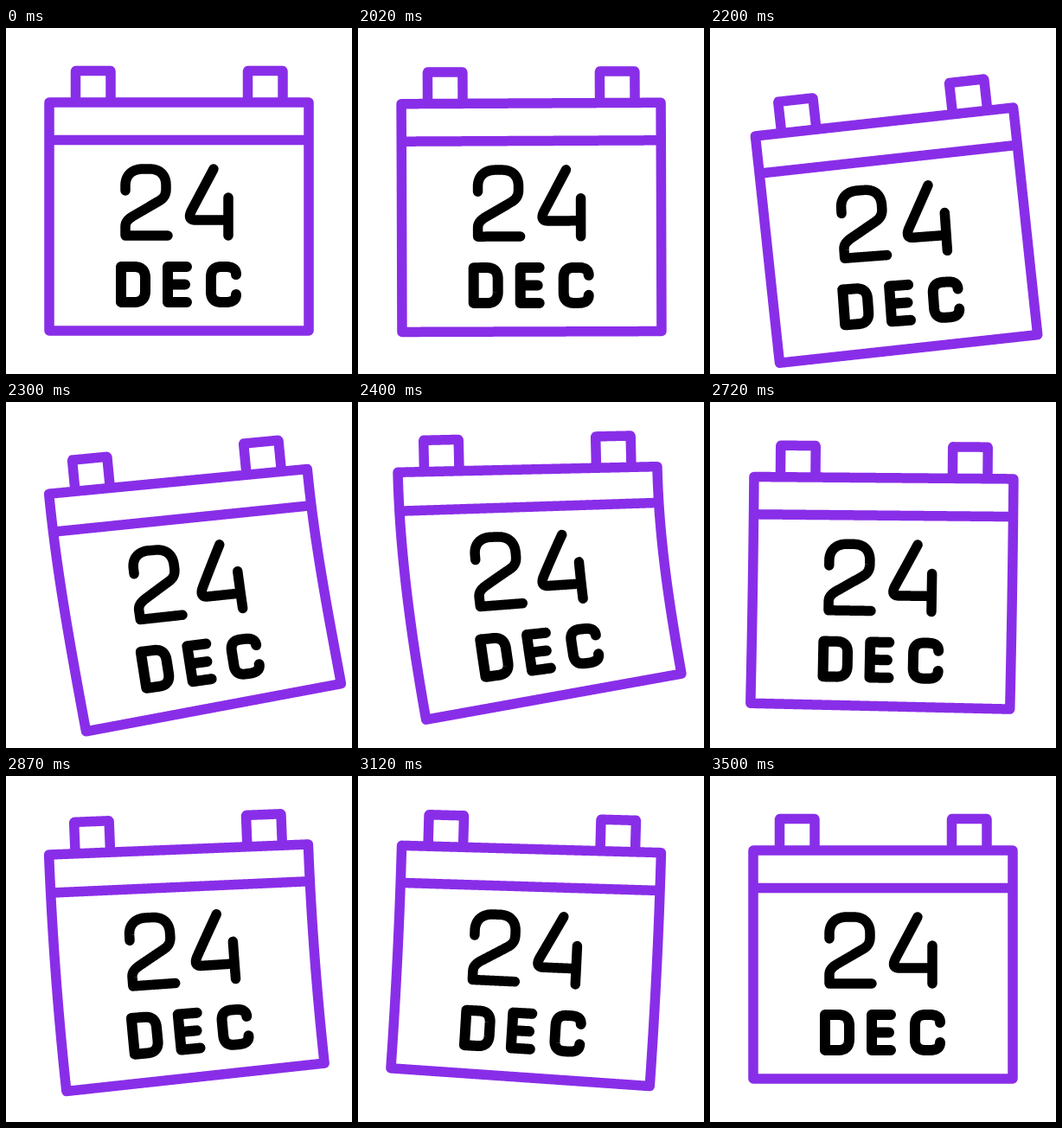
Recreate the animation shown at these times as an HTML page with a canvas. Size 400 px wide and 400 px high, loop 3.52 s.

```html
<!DOCTYPE html>
<html lang="en">
<head>
<meta charset="utf-8">
<title>Swinging calendar</title>
<style>
  html, body { margin: 0; width: 100%; height: 100%; overflow: hidden; background: #fff; }
  canvas { display: block; }
</style>
</head>
<body>
<canvas id="stage" width="400" height="400"></canvas>
<script>
const ctx = document.getElementById('stage').getContext('2d');
const LOOP = 3520, TOP = 86, HEIGHT = 264, CENTER = 200, LETTER_PIVOT = 230;

const FRAME = [
  'M50 86H350V350H50Z', 'M50 129.5H350',
  'M80.5 86V49.5H121V86', 'M279.5 86V49.5H320V86'
];
const DATE = [
  'M138 188V182C138 170 146 163 158 163H166C178 163 185 170 185 182V186C185 193 182 197 177 200L146 218C140 222 138 225 138 230V240H187',
  'M240 163L214.5 211Q209 222 219 222H257', 'M257 196V240'
];
const MONTH = [
  'M133 276V317H148Q161 317 161 304V289Q161 276 148 276Z',
  'M209 276H187V317H209', 'M187 296.5H207',
  'M266 285Q266 276 254 276H249Q237 276 237 288V305Q237 317 249 317H254Q266 317 266 308'
];

// time, y shift, top x shift, top angle, bottom x shift, bottom angle, lettering x shift, lettering turn
const KEYS = [
  [1995, 0, 0, 0, 0, 0, 0, 0],
  [2200, 22.5, 1.5, -6.3, 29.5, -6.2, 0, 2],
  [2300, 6, -1, -5.5, 40, -10.6, -3, 1.5],
  [2400, -8, -4, -1.3, 26.5, -10.2, -5.5, 0.8],
  [2520, -9, -1, 1.5, -11, 3, -1, 0],
  [2600, 3.5, 2, 2.5, -19.5, 6.8, 0, 0],
  [2870, -1, -0.5, -2.3, 19, -6.2, 0, 0],
  [3130, -1.5, 0.5, 1.6, -12.5, 4, 0, 0],
  [3500, 0, 0, 0, 0, 0, 0, 0]
];

const radians = degrees => degrees * Math.PI / 180;

function sample(d) {
  const path = document.createElementNS('http://www.w3.org/2000/svg', 'path');
  path.setAttribute('d', d);
  const length = path.getTotalLength(), count = Math.ceil(length);
  return Array.from({ length: count + 1 }, (_, i) => path.getPointAtLength(length * i / count));
}

function hermite(u, a, b, slopeA, slopeB) {
  const v = 1 - u;
  return a * v * v * (1 + 2 * u) + b * u * u * (3 - 2 * u) + slopeA * u * v * v - slopeB * u * u * v;
}

// Monotone tangent: flat at every turning point
function tangent(i, col) {
  if (i === 0 || i === KEYS.length - 1) return 0;
  const rate = j => (KEYS[j + 1][col] - KEYS[j][col]) / (KEYS[j + 1][0] - KEYS[j][0]);
  const before = rate(i - 1), after = rate(i);
  return before * after <= 0 ? 0 : 2 * before * after / (before + after);
}

function poseAt(time) {
  const last = KEYS.length - 1;
  if (time <= KEYS[0][0] || time >= KEYS[last][0]) return KEYS[0].slice(1);
  const i = KEYS.findIndex(key => key[0] > time) - 1;
  const from = KEYS[i], to = KEYS[i + 1], span = to[0] - from[0];
  return from.slice(1).map((value, k) => hermite((time - from[0]) / span, value, to[k + 1],
    tangent(i, k + 1) * span, tangent(i + 1, k + 1) * span));
}

// Bends the sheet: each row is turned and placed along a curved middle line
function makeWarp([shiftY, topX, topDeg, bottomX, bottomDeg]) {
  const top = radians(topDeg), bottom = radians(bottomDeg);
  const topSlope = -HEIGHT * Math.sin(top), bottomSlope = -HEIGHT * Math.sin(bottom);
  const squeeze = Math.cos((top + bottom) / 2);
  return (x, y) => {
    const u = (y - TOP) / HEIGHT;
    const angle = top + (bottom - top) * Math.max(u, 0) ** 1.5;
    const mid = u < 0 ? topX + topSlope * u : hermite(u, topX, bottomX, topSlope, bottomSlope);
    const dx = x - CENTER;
    return [CENTER + mid + dx * Math.cos(angle),
            TOP + shiftY + (y - TOP) * squeeze + dx * Math.sin(angle)];
  };
}

// The lettering trails the sheet slightly
function makeLetterWarp(warp, shiftX, turnDeg) {
  const sin = Math.sin(radians(turnDeg)), cos = Math.cos(radians(turnDeg));
  return (x, y) => {
    const dx = x - CENTER, dy = y - LETTER_PIVOT;
    return warp(CENTER + shiftX + dx * cos - dy * sin, LETTER_PIVOT + dx * sin + dy * cos);
  };
}

function stroke(shapes, color, width, warp) {
  ctx.strokeStyle = color;
  ctx.lineWidth = width;
  ctx.beginPath();
  for (const points of shapes) {
    points.forEach((p, i) => ctx[i ? 'lineTo' : 'moveTo'](...warp(p.x, p.y)));
  }
  ctx.stroke();
}

const frame = FRAME.map(sample), date = DATE.map(sample), month = MONTH.map(sample);
ctx.lineCap = ctx.lineJoin = 'round';

function draw() {
  const pose = poseAt(performance.now() % LOOP);
  const warp = makeWarp(pose);
  const letterWarp = makeLetterWarp(warp, pose[5], pose[6]);
  ctx.fillStyle = '#fff';
  ctx.fillRect(0, 0, 400, 400);
  stroke(frame, '#892ee8', 11.5, warp);
  stroke(date, '#000', 11.5, letterWarp);
  stroke(month, '#000', 12, letterWarp);
  requestAnimationFrame(draw);
}
draw();
</script>
</body>
</html>
```
